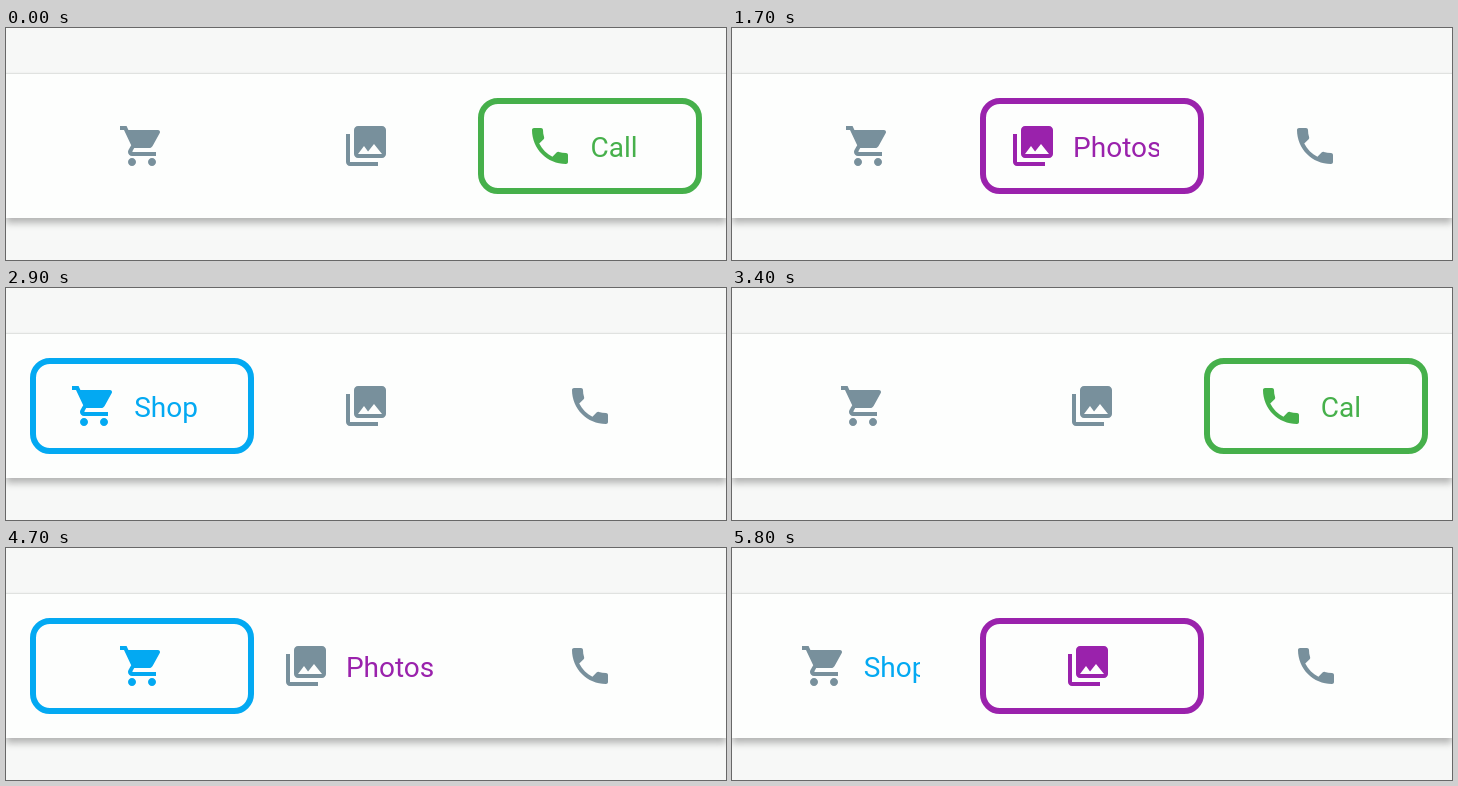
Recreate the animation shown at these times as an HTML page. Size 720x232 px, loop 5.9 s.

```html
<!DOCTYPE html>
<html lang="en">
<head>
<meta charset="utf-8">
<title>Bubble tab bar</title>
<style>
  /* --open: how far the label is unfolded; --on: whether the tab is selected */
  @property --open { syntax: "<number>"; inherits: true; initial-value: 0; }
  @property --on { syntax: "<number>"; inherits: true; initial-value: 0; }

  html, body { margin: 0; width: 100%; height: 100%; overflow: hidden; background: #f7f8f7; }

  .stage { position: relative; width: 720px; height: 232px; overflow: hidden; }

  .bar {
    position: absolute; left: 0; top: 46px; width: 720px; height: 144px;
    box-sizing: border-box; padding: 24px; display: flex;
    background: #fdfefd;
    box-shadow: 0 -1px 1px #e0e2e0, 0 5px 7px rgba(0, 0, 0, .28);
  }

  .tab {
    position: relative; width: 224px; height: 96px;
    display: flex; align-items: center; justify-content: center;
    animation: 5.9s infinite cubic-bezier(.82, 0, 0, 1), 5.9s infinite step-end;
  }
  .tab::before {
    content: ""; position: absolute; inset: 0; box-sizing: border-box;
    border: 6px solid var(--hue); border-radius: 20px; opacity: var(--on);
  }
  .shop { --hue: #03a9f2; animation-name: shop-open, shop-on; }
  .photos { --hue: #9a22ac; animation-name: photos-open, photos-on; }
  .call { --hue: #46b04b; animation-name: call-open, call-on; }

  svg {
    flex: none; width: 48px; height: 48px;
    fill: color-mix(in srgb, var(--hue) calc(var(--on) * 100%), #78909c);
  }

  .title {
    position: relative; flex: none; height: 48px;
    width: calc(var(--open) * (var(--text, 0px) + 32px));
  }
  .title span {
    position: absolute; inset: 0 16px; overflow: hidden; white-space: nowrap;
    font: 28px/51px Roboto, sans-serif; color: var(--hue);
  }

  @keyframes shop-open {
    0%, 35.59% { --open: 0; }
    47.39%, 50.76% { --open: 1; }
    62.56%, 79.07% { --open: 0; }
    90.86% { --open: 1; }
    94.91% { --open: 1; animation-timing-function: cubic-bezier(.948, 0, .948, .5); }
    100% { --open: .5; }
  }
  @keyframes photos-open {
    0%, 19.66% { --open: 0; }
    31.46%, 35.59% { --open: 1; }
    47.39%, 66.02% { --open: 0; }
    77.81%, 79.07% { --open: 1; }
    90.86% { --open: 0; }
    94.91% { --open: 0; animation-timing-function: cubic-bezier(.948, 0, .948, .5); }
    100% { --open: .5; }
  }
  @keyframes call-open {
    0%, 19.66% { --open: 1; }
    31.46%, 50.76% { --open: 0; }
    62.56%, 66.02% { --open: 1; }
    77.81%, 100% { --open: 0; }
  }

  @keyframes shop-on {
    0%, 50.84%, 94.91%, 100% { --on: 0; }
    35.59%, 79.66% { --on: 1; }
  }
  @keyframes photos-on {
    0%, 35.59%, 79.66% { --on: 0; }
    20.33%, 66.1%, 94.91%, 100% { --on: 1; }
  }
  @keyframes call-on {
    0%, 50.84% { --on: 1; }
    20.33%, 66.1%, 100% { --on: 0; }
  }
</style>
</head>
<body>
<div class="stage">
  <div class="bar">
    <div class="tab shop">
      <svg viewBox="0 0 24 24"><path d="M7 18c-1.1 0-1.99.9-1.99 2S5.9 22 7 22s2-.9 2-2-.9-2-2-2zM1 2v2h2l3.6 7.59-1.35 2.45c-.16.28-.25.61-.25.96 0 1.1.9 2 2 2h12v-2H7.42c-.14 0-.25-.11-.25-.25l.03-.12.9-1.63h7.45c.75 0 1.41-.41 1.75-1.03l3.58-6.49c.08-.14.12-.31.12-.48 0-.55-.45-1-1-1H5.21l-.94-2H1zm16 16c-1.1 0-1.99.9-1.99 2s.89 2 1.99 2 2-.9 2-2-.9-2-2-2z"/></svg>
      <div class="title"><span>Shop</span></div>
    </div>
    <div class="tab photos">
      <svg viewBox="0 0 24 24"><path d="M22 16V4c0-1.1-.9-2-2-2H8c-1.1 0-2 .9-2 2v12c0 1.1.9 2 2 2h12c1.1 0 2-.9 2-2zm-11-4l2.03 2.71L16 11l4 5H8l3-4zM2 6v14c0 1.1.9 2 2 2h14v-2H4V6H2z"/></svg>
      <div class="title"><span>Photos</span></div>
    </div>
    <div class="tab call">
      <svg viewBox="0 0 24 24"><path d="M6.62 10.79c1.44 2.83 3.76 5.14 6.59 6.59l2.2-2.2c.27-.27.67-.36 1.02-.24 1.12.37 2.33.57 3.57.57.55 0 1 .45 1 1V20c0 .55-.45 1-1 1-9.39 0-17-7.61-17-17 0-.55.45-1 1-1h3.5c.55 0 1 .45 1 1 0 1.25.2 2.45.57 3.57.11.35.03.74-.25 1.02l-2.2 2.2z"/></svg>
      <div class="title"><span>Call</span></div>
    </div>
  </div>
</div>
<script>
  // Each label unfolds to the natural width of its text.
  for (const title of document.querySelectorAll(".title")) {
    const range = document.createRange();
    range.selectNodeContents(title.firstChild);
    title.style.setProperty("--text", range.getBoundingClientRect().width + "px");
  }
</script>
</body>
</html>
```
